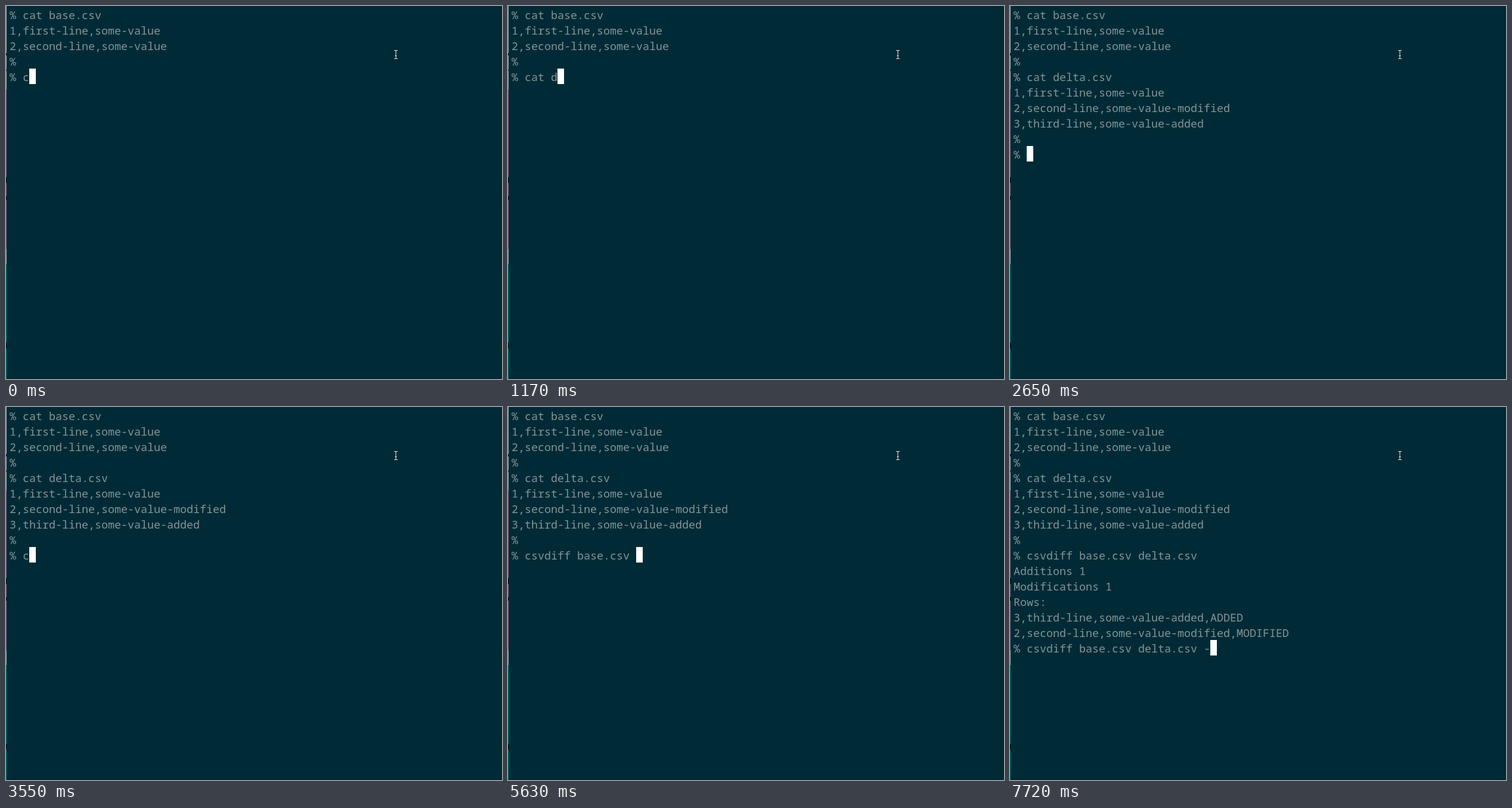
An HTML page that plays this animation: 832 px wide and 626 px high, repeating every 8 s.

```html
<!DOCTYPE html>
<html lang="en">
<head>
<meta charset="utf-8">
<title>Terminal session</title>
<style>
  html, body { margin: 0; width: 100%; height: 100%; overflow: hidden; background: #002b36; }
  #stage { position: relative; width: 832px; height: 626px; overflow: hidden; background: #002b36; }
  #text {
    position: absolute; left: 6px; top: 2px; margin: 0; color: #839496;
    font: 500 18.333px/26px "Noto Sans Mono", "DejaVu Sans Mono", monospace;
    font-variant-ligatures: none;
  }
  #cursor { position: absolute; width: 11px; height: 26px; background: #fff; }
  svg { position: absolute; left: 0; top: 0; }
</style>
</head>
<body>
<div id="stage">
  <svg width="832" height="626" shape-rendering="crispEdges">
    <!-- sliver of the window behind -->
    <path d="M.5 0V140M.5 408V433" stroke="#a9b0b2"/>
    <path d="M.5 140V408" stroke="#8a5f7c"/>
    <path d="M.5 433V626" stroke="#007f80"/>
    <path d="M.5 79v4M.5 287v10M.5 319v6M.5 565v10" stroke="#000a0e"/>
    <path d="M.5 106v3" stroke="#7c3a30"/>
    <path d="M1 625.5H832" stroke="#00242e"/>
    <!-- mouse pointer -->
    <g fill="none" shape-rendering="auto">
      <path d="M651 74.5h2l1 1 1-1h2M654 75v12M651 88.5h2l1-1 1 1h2" stroke="#001219" stroke-width="2.6"/>
      <path d="M651 74.5h2l1 1 1-1h2M654 75v12M651 88.5h2l1-1 1 1h2M652.5 83.5h3" stroke="#e8eeee" stroke-width="1.1"/>
    </g>
  </svg>
  <pre id="text"></pre>
  <div id="cursor"></div>
</div>
<script>
const LOOP = 8000, CELL = 11, ROW = 26;
const lines = `% cat base.csv
1,first-line,some-value
2,second-line,some-value
%
% cat delta.csv
1,first-line,some-value
2,second-line,some-value-modified
3,third-line,some-value-added
%
% csvdiff base.csv delta.csv
Additions 1
Modifications 1
Rows:
3,third-line,some-value-added,ADDED
2,second-line,some-value-modified,MODIFIED`.split("\n");

// [time, prompt row, typed input]
const steps = [
  [0, 4, "c"], [140, 4, "ca"], [290, 4, "cat "], [430, 4, "cat d"],
  [580, 4, "cat df"], [730, 4, "cat dfe"], [1020, 4, "cat df"], [1170, 4, "cat d"],
  [1460, 4, "cat "], [1610, 4, "cat d"], [1760, 4, "cat de"], [1910, 4, "cat delta.csv "],
  [2210, 8, ""], [2650, 9, ""],
  [3550, 9, "c"], [3700, 9, "csv"], [4000, 9, "csvd"],
  [4600, 9, "csvdi"], [4750, 9, "csvdif"], [4890, 9, "csvdiff"], [5040, 9, "csvdiff "],
  [5190, 9, "csvdiff b"], [5330, 9, "csvdiff ba"], [5480, 9, "csvdiff bas"],
  [5630, 9, "csvdiff base.csv "], [5780, 9, "csvdiff base.csv d"],
  [5930, 9, "csvdiff base.csv de"], [6080, 9, "csvdiff base.csv del"],
  [6230, 9, "csvdiff base.csv delta.csv "],
  [6680, 15, ""], [7430, 15, "csvdiff base.csv delta.csv"],
  [7580, 15, "csvdiff base.csv delta.csv "], [7720, 15, "csvdiff base.csv delta.csv -"]
];

const text = document.getElementById("text");
const cursor = document.getElementById("cursor");
let shown;

function draw(now) {
  const t = Math.max(0, now) % LOOP;
  const step = steps.findLast(s => s[0] <= t);
  if (step !== shown) {
    shown = step;
    const [, row, input] = step;
    text.textContent = [...lines.slice(0, row), "% " + input].join("\n");
    cursor.style.left = 6 + CELL * (input.length + 2) + "px";
    cursor.style.top = 1 + ROW * row + "px";
  }
}

const start = performance.now();
function tick() {
  draw(performance.now() - start);
  requestAnimationFrame(tick);
}
tick();
</script>
</body>
</html>
```
